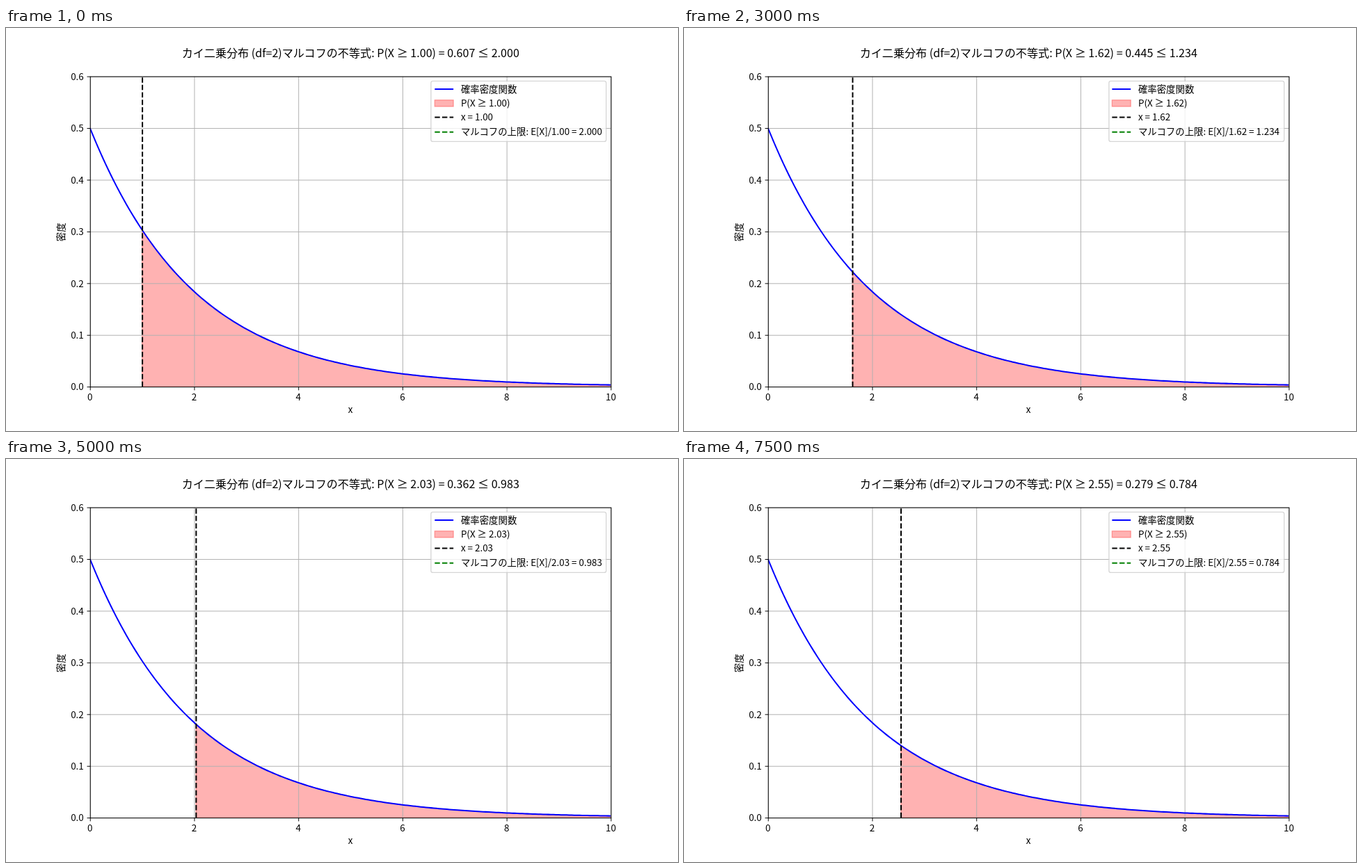
Recreate the animation shown at these times as an HTML page. Size 966 px wide and 580 px high, loop 8 s.

```html
<!DOCTYPE html>
<html lang="ja">
<head>
<meta charset="utf-8">
<style>
  html, body { margin: 0; width: 100%; height: 100%; overflow: hidden; background: #fff; }
  svg { display: block; width: 966px; height: 580px; }
  text { font: 13.89px "Noto Sans CJK JP", "Noto Sans CJK", "Noto Sans", sans-serif; fill: #000; white-space: pre; }
  .title { font-size: 16.67px; }
  .mid { text-anchor: middle; }
  .end { text-anchor: end; }
  .grid { stroke: #b0b0b0; fill: none; }
  .axis { stroke: #000; fill: none; }
  .area { fill: red; stroke: red; stroke-width: 1.39; opacity: 1; fill-opacity: .3; stroke-opacity: .3; }
  .line { fill: none; stroke-width: 2.08; }
  .dash { stroke-dasharray: 7.71 3.33; }
</style>
</head>
<body>
<svg id="chart" viewBox="0 0 1000 600" preserveAspectRatio="none">
  <clipPath id="plot"><rect x="125" y="72" width="775" height="462"/></clipPath>
</svg>
<script>
const STEP_MS = 500, STEPS = 16, MEAN = 2;
const LEFT = 125, RIGHT = 900, TOP = 72, BOTTOM = 534;
const svg = document.getElementById('chart');

function add(tag, attrs, parent = svg, content = '') {
  const node = document.createElementNS('http://www.w3.org/2000/svg', tag);
  for (const key in attrs) node.setAttribute(key, attrs[key]);
  node.textContent = content;
  parent.appendChild(node);
  return node;
}
const label = (x, y, content, cls = '', parent = svg) =>
  add('text', { x, y, class: cls }, parent, content);

const px = x => LEFT + x * 77.5;
const py = y => BOTTOM - y * 770;
const density = x => Math.exp(-x / 2) / 2;

function curve(from) {
  const points = [];
  for (let i = 0; i <= 200; i++) {
    const x = from + (10 - from) * i / 200;
    points.push(px(x).toFixed(2) + ' ' + py(density(x)).toFixed(2));
  }
  return 'M' + points.join('L');
}

// Plot area
const clipped = { 'clip-path': 'url(#plot)' };
const area = add('path', { class: 'area', ...clipped });
let gridPath = '', tickPath = '';
for (let i = 0; i <= 5; i++) {
  const x = px(i * 2) + .5;
  gridPath += `M${x} ${TOP}V${BOTTOM}`;
  tickPath += `M${x} ${BOTTOM + .5}v4.9`;
  label(x - .5, 554.3, i * 2, 'mid');
}
for (let i = 0; i <= 6; i++) {
  const y = Math.round(py(i / 10)) + .5;
  gridPath += `M${LEFT} ${y}H${RIGHT}`;
  tickPath += `M${LEFT + .5} ${y}h-4.9`;
  label(115.7, y + 4.9, (i / 10).toFixed(1), 'end');
}
add('path', { class: 'grid', d: gridPath });
add('path', { class: 'line', stroke: 'blue', d: curve(0), ...clipped });
const marker = add('path', { class: 'line dash', stroke: '#000', ...clipped });
add('path', { class: 'axis', d: tickPath });
add('rect', { class: 'axis', x: LEFT + .5, y: TOP + .5, width: 775, height: 462 });

const title = label(512.7, 43.4, '', 'title mid');
label(512.5, 573.3, 'x', 'mid');
add('text', { class: 'mid', transform: 'translate(87 304) rotate(-90)' }, svg, '密度');

// Legend
add('rect', {
  x: 632.4, y: 79, width: 260.7, height: 90, rx: 2.78,
  fill: '#fff', stroke: '#ccc', 'stroke-width': 1.39, opacity: .8
});
const legend = add('g', {});
const key = (y, stroke, cls = '') =>
  add('path', { class: 'line ' + cls, stroke, d: `M638 ${y}h27.8` }, legend);
key(91, 'blue');
add('rect', { class: 'area', x: 638, y: 107.2, width: 27.8, height: 9.7 }, legend);
key(133, '#000', 'dash');
key(155, 'green', 'dash');
label(676.9, 95.9, '確率密度関数', '', legend);
const [tailText, xText, boundText] = [116.8, 137.8, 159.8].map(y => label(676.9, y, '', '', legend));

let shown = -1;
function draw(step) {
  if (step === shown) return;
  shown = step;
  const a = 1 + step * 3 / 29;
  const value = a.toFixed(2);
  const tail = Math.exp(-a / 2).toFixed(3);
  const bound = (MEAN / a).toFixed(3);
  area.setAttribute('d', `${curve(a)}V${BOTTOM}H${px(a)}Z`);
  marker.setAttribute('d', `M${Math.round(px(a))} ${BOTTOM}V${TOP}`);
  title.textContent = `カイ二乗分布 (df=2)マルコフの不等式: P(X ≥ ${value}) = ${tail} ≤ ${bound}`;
  tailText.textContent = `P(X ≥ ${value})`;
  xText.textContent = `x = ${value}`;
  boundText.textContent = `マルコフの上限: E[X]/${value} = ${bound}`;
  // Wider final digits push the right-aligned legend entries left.
  legend.setAttribute('transform', `translate(${/[47]$/.test(bound) ? -1 : 0} 0)`);
}

const start = performance.now();
function tick() {
  draw(Math.floor((performance.now() - start) / STEP_MS) % STEPS);
  requestAnimationFrame(tick);
}
tick();
</script>
</body>
</html>
```
